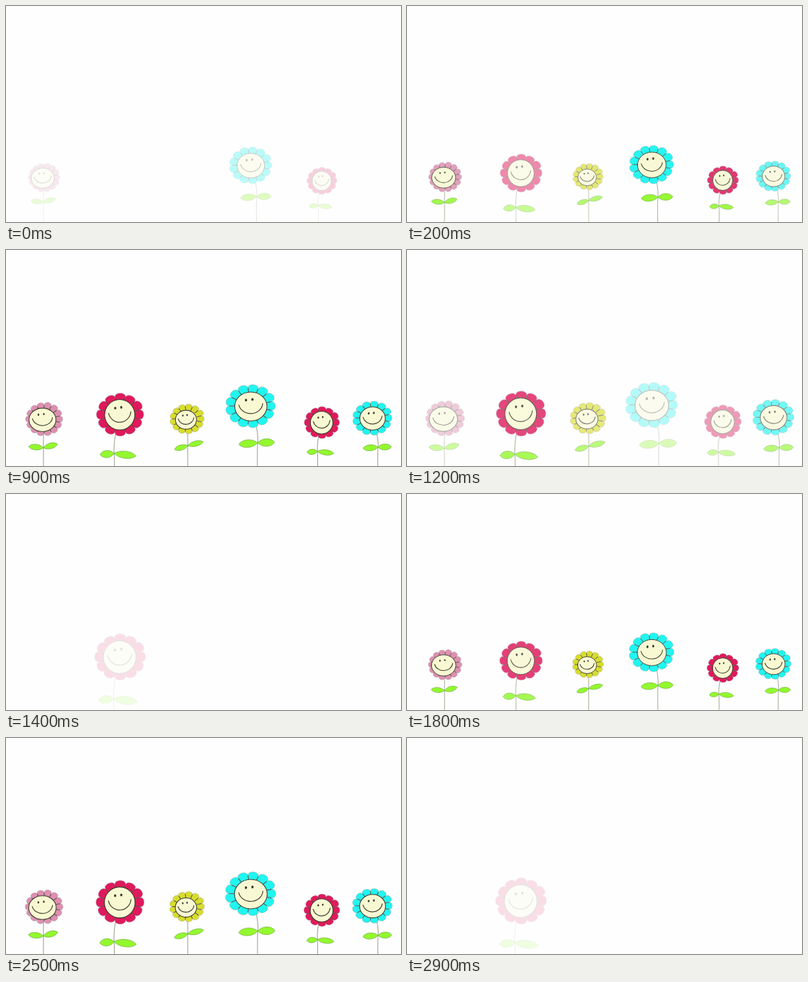
Recreate the animation shown at these times as an HTML page. Size 600 by 330 pixels, loop 3 s.

```html
<!DOCTYPE html>
<html lang="en">
<head>
<meta charset="utf-8">
<title>Smiling flowers</title>
<style>
  html, body { margin: 0; width: 100%; height: 100%; overflow: hidden; background: #fefefe; }
  svg { display: block; width: 600px; height: 330px; }
</style>
</head>
<body>
<svg id="stage" viewBox="0 0 600 330" fill="none" stroke-linecap="round" stroke-linejoin="round"></svg>
<script>
const PERIOD = 1500, STEP = 100, LIFE = 1390, FADE = 300, GROWTH = 0.000172;
const INK = '#3b392c';
const stage = document.getElementById('stage');

// Lengths are in units of the head's half width, measured from its centre;
// leaf tips are measured from the node where the leaves join the stem.
const kinds = {
  pink:   { fill: '#de8fb0', petals: 14, ry: 0.89, face: [-0.09, 0.04, 0.71, 0.62],
            node: [-0.04, 1.52], leaves: [[-0.78, -0.07], [0.74, -0.2]] },
  red:    { fill: '#e0195c', petals: 12, ry: 0.9, face: [-0.02, 0.01, 0.62, 0.63],
            node: [-0.25, 1.61], leaves: [[-0.58, 0.05], [0.9, 0.11]] },
  yellow: { fill: '#d8dd2b', petals: 13, ry: 0.86, face: [-0.06, 0.05, 0.6, 0.54],
            node: [0.04, 1.53], leaves: [[-0.75, 0.22], [0.88, -0.22]] },
  cyan:   { fill: '#20f5f0', petals: 13, ry: 0.86, face: [0.01, 0.02, 0.63, 0.57],
            node: [0.28, 1.45], leaves: [[-0.74, 0.06], [0.66, -0.02]] }
};

const flowers = [
  { kind: 'pink',   x: 58,    y: 260,   size: 27,   start: -55 },
  { kind: 'red',    x: 173.5, y: 253.5, size: 34.5, start: 50 },
  { kind: 'yellow', x: 275,   y: 259.5, size: 25,   start: 0 },
  { kind: 'cyan',   x: 371.5, y: 240.5, size: 36.3, start: -90 },
  { kind: 'red',    x: 480,   y: 265,   size: 25.7, start: -60 },
  { kind: 'cyan',   x: 556.5, y: 258.5, size: 28.7, start: 0 }
];

function add(parent, tag, attrs) {
  const el = document.createElementNS('http://www.w3.org/2000/svg', tag);
  for (const key in attrs) el.setAttribute(key, attrs[key]);
  parent.appendChild(el);
}

function random(seed) {
  return () => (seed = (seed * 16807) % 2147483647) / 2147483647;
}

function build({ kind, x, y, size }) {
  const { fill, petals, ry, face, node, leaves } = kinds[kind];
  const g = document.createElementNS('http://www.w3.org/2000/svg', 'g');
  const pt = (u, v) => `${(x + u * size).toFixed(2)} ${(y + v * size).toFixed(2)}`;
  const [nx, ny] = node;

  add(g, 'path', {
    d: `M${pt(nx * 0.75, ry * 0.85)}Q${pt(nx * 1.1, ny * 0.8)} ${pt(nx, ny)}T${pt(nx, ny + 1.6)}`,
    stroke: '#9ba087', 'stroke-width': 1
  });

  for (const [tx, ty] of leaves) {
    const bulge = 0.2 / Math.hypot(tx, ty);
    const side = (k, w) => pt(nx + tx * k - ty * bulge * w, ny + ty * k + tx * bulge * w);
    add(g, 'path', {
      d: `M${side(0, 0)}C${side(0.25, 1)} ${side(0.8, 1)} ${side(1, 0)}` +
         `C${side(0.8, -1)} ${side(0.25, -1)} ${side(0, 0)}Z`,
      fill: '#93f82e', stroke: '#79a84c', 'stroke-width': 0.7
    });
  }

  const rnd = random(71), half = Math.PI / petals;
  let crown = '', seams = '';
  for (let i = 0; i < petals; i++) {
    const tip = 1.05 + 0.06 * rnd();
    const at = (k, r) => {
      const a = (2 * i + k) * half;
      return pt(r * Math.cos(a), r * ry * Math.sin(a));
    };
    crown += `M${at(-1, 0.5)}L${at(-1, 0.83)}C${at(-0.9, tip)} ${at(0.9, tip)} ${at(1, 0.83)}L${at(1, 0.5)}Z`;
    seams += `M${at(1, 0.6)}L${at(1, 0.82)}`;
  }
  add(g, 'path', { d: crown, fill, stroke: '#a5a5a5', 'stroke-opacity': 0.6, 'stroke-width': 0.8 });
  add(g, 'path', { d: seams, stroke: INK, 'stroke-opacity': 0.75, 'stroke-width': 1 });

  const [fx, fy, fw, fh] = face;
  const on = (u, v) => pt(fx + u * fw, fy + v * fh);
  const oval = r => `${r * fw * size} ${r * fh * size}`;
  add(g, 'path', {
    d: `M${on(-1, 0)}A${oval(1)} 0 1 1 ${on(1, 0)}A${oval(1)} 0 1 1 ${on(-1, 0)}Z`,
    fill: '#f8f9d3', stroke: INK, 'stroke-width': 1
  });
  // wide grin, tipped up a little to the right
  add(g, 'path', { d: `M${on(-0.74, -0.1)}A${oval(0.75)} 0 0 0 ${on(0.74, -0.2)}`, stroke: INK, 'stroke-width': 1.1 });
  for (const [u, v] of [[-0.3, -0.44], [0.1, -0.49]])
    add(g, 'path', { d: `M${on(u, v - 0.02)}L${on(u, v + 0.02)}`, stroke: INK, 'stroke-width': size * 0.085 });

  return stage.appendChild(g);
}

const groups = flowers.map(build);

function render(ms) {
  const t = Math.floor(ms / STEP) * STEP;
  flowers.forEach(({ x, y, size, start }, i) => {
    const age = (t - start + PERIOD) % PERIOD;
    const alpha = Math.max(0, Math.min(1, age / FADE, (LIFE - age) / FADE));
    const scale = 1 + GROWTH * (age + start - 500);
    const py = y + 0.88 * size;
    groups[i].setAttribute('opacity', alpha.toFixed(3));
    groups[i].setAttribute('transform', `translate(${x} ${py}) scale(${scale}) translate(${-x} ${-py})`);
  });
}

const begin = performance.now();
function tick() {
  render(performance.now() - begin);
  requestAnimationFrame(tick);
}
tick();
</script>
</body>
</html>
```
